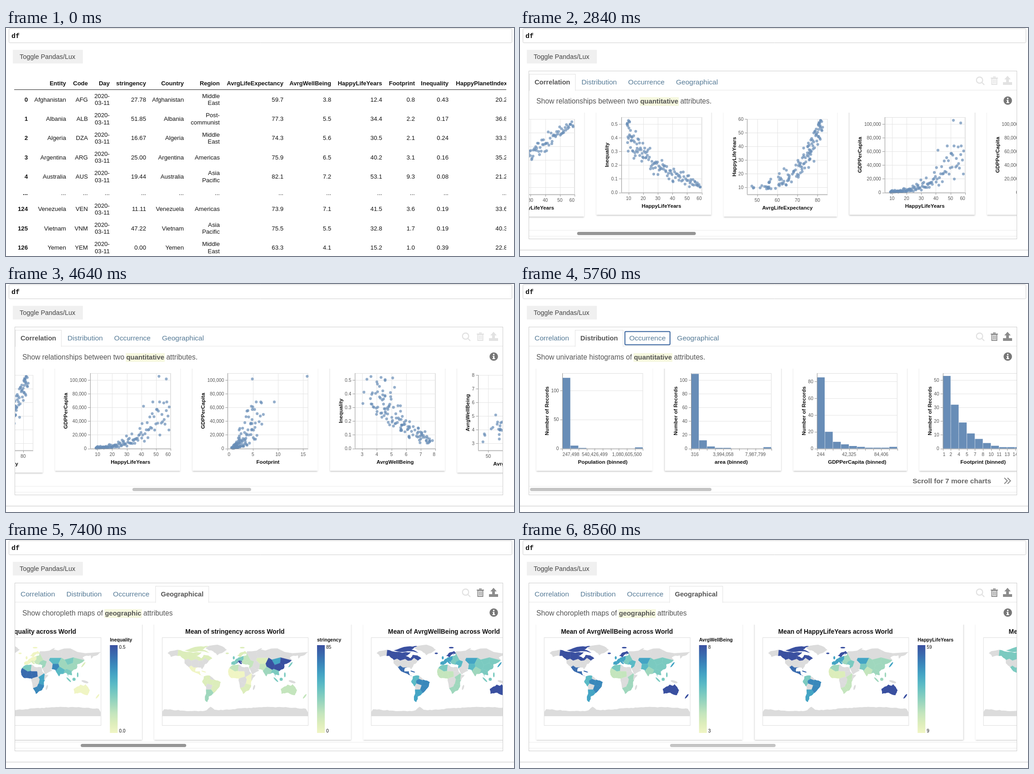
Write an HTML page with a canvas that moves like this. It is 1117 px wide and 501 px high and loops after 8.6 s.

```html
<!DOCTYPE html>
<html lang="en">
<head>
<meta charset="utf-8">
<title>Data frame widget</title>
<style>
html, body { margin: 0; width: 1117px; height: 501px; overflow: hidden; background: #fff; }
canvas { display: block; width: 1117px; height: 501px; }
</style>
</head>
<body>
<canvas id="stage"></canvas>
<script>
const W = 1117, H = 501, LOOP = 8600, STEP = 40;
const canvas = document.getElementById('stage'), c = canvas.getContext('2d');
const dpr = window.devicePixelRatio || 1;
canvas.width = W * dpr;
canvas.height = H * dpr;

const SANS = '"Liberation Sans", Arial, sans-serif';
const BLUE = '#688db7';

// ---------- drawing helpers ----------
function widthOf(s, size, bold) {
  c.font = `${bold ? 'bold ' : ''}${size}px ${SANS}`;
  return c.measureText(s).width;
}

function text(s, x, y, size = 13.2, { bold, align = 'left', color = '#111' } = {}) {
  const w = widthOf(s, size, bold);
  c.textAlign = align;
  c.textBaseline = 'alphabetic';
  c.fillStyle = color;
  c.fillText(s, x, y + size * 0.35);
  return w;
}

function rect(x, y, w, h, fill) { c.fillStyle = fill; c.fillRect(x, y, w, h); }
const hline = (x1, x2, y, color) => rect(x1, Math.round(y), x2 - x1, 1, color);
const vline = (x, y1, y2, color) => rect(Math.round(x), y1, 1, y2 - y1, color);

function frame(x, y, w, h, color, width = 1) {
  c.strokeStyle = color;
  c.lineWidth = width;
  c.strokeRect(x + width / 2, y + width / 2, w - width, h - width);
}

function upright(s, x, y) {
  c.save();
  c.translate(x, y);
  c.rotate(-Math.PI / 2);
  text(s, 0, 0, 11.6, { bold: true, align: 'center' });
  c.restore();
}

function clipTo(x, y, w, h, draw) {
  c.save();
  c.beginPath();
  c.rect(x, y, w, h);
  c.clip();
  draw();
  c.restore();
}

let seed = 7;
const rnd = () => (seed = (seed * 16807) % 2147483647) / 2147483647;
const noise = () => rnd() + rnd() + rnd() - 1.5;

// ---------- table ----------
const COLS = [
  ['', 48], ['Entity', 132], ['Code', 180], ['Day', 228], ['stringency', 308], ['Country', 391],
  ['Region', 470], ['AvrgLifeExpectancy', 610], ['AvrgWellBeing', 715], ['HappyLifeYears', 827],
  ['Footprint', 899], ['Inequality', 973], ['HappyPlanetIndex', 1102]];
const ROWS = [
  '0|Afghanistan|AFG|27.78|Middle/East|59.7|3.8|12.4|0.8|0.43|20.2',
  '1|Albania|ALB|51.85|Post-/communist|77.3|5.5|34.4|2.2|0.17|36.8',
  '2|Algeria|DZA|16.67|Middle/East|74.3|5.6|30.5|2.1|0.24|33.3',
  '3|Argentina|ARG|25.00|Americas|75.9|6.5|40.2|3.1|0.16|35.2',
  '4|Australia|AUS|19.44|Asia/Pacific|82.1|7.2|53.1|9.3|0.08|21.2',
  '...|...|...|...|...|...|...|...|...|...|...',
  '124|Venezuela|VEN|11.11|Americas|73.9|7.1|41.5|3.6|0.19|33.6',
  '125|Vietnam|VNM|47.22|Asia/Pacific|75.5|5.5|32.8|1.7|0.19|40.3',
  '126|Yemen|YEM|0.00|Middle/East|63.3|4.1|15.2|1.0|0.39|22.8'];

function drawTable() {
  clipTo(0, 90, 1100, 411, () => {
    COLS.forEach(([name, x]) => text(name, x, 121, 13, { bold: true, align: 'right' }));
    hline(18, 1100, 135, '#222');
    let top = 136;
    ROWS.forEach(row => {
      const cells = row.split('|'), gap = cells[0] === '...', height = gap ? 29 : 42.3;
      cells.splice(3, 0, gap ? '...' : '2020-/03-11');
      cells.splice(5, 0, cells[1]);
      cells.forEach((cell, i) => {
        const lines = cell.split('/');
        lines.forEach((s, k) => text(s, COLS[i][1], top + height / 2 + (k - (lines.length - 1) / 2) * 15.4,
          13.2, { bold: !i, align: 'right' }));
      });
      top += height;
    });
  });
}

// ---------- data: one correlated sample feeds every scatter plot ----------
const people = Array.from({ length: 125 }, (_, i) => {
  const h = 9 + 50.5 * Math.pow((i + rnd()) / 125, 1.45);
  const g = Math.min(68000, (600 + Math.pow(h / 60, 2.8) * 60000) * Math.exp(noise() * 0.8));
  return {
    H: h,
    L: Math.min(83.7, 84.5 - 46 * Math.exp(-h / 22) + noise() * 9 * (1 - h / 70)),
    Q: Math.max(0.04, 0.62 * Math.exp(-h / 26) + noise() * 0.12 * (1 - h / 80)),
    W: Math.min(7.8, 3.25 + 0.0745 * h + noise() * 1.15 * (1 - h / 75)),
    G: g,
    F: Math.min(9.4, (0.7 + Math.sqrt(g / 1000) * 0.62) * Math.exp(noise() * 0.5)),
  };
});
people.push({ H: 52, L: 82, Q: 0.07, W: 7, G: 105447, F: 15.8 }, { H: 57, L: 81, Q: 0.07, W: 7.6, G: 101600, F: 4.9 });

const AXES = { // name, low, high, tick step
  L: ['AvrgLifeExpectancy', 45, 85, 10], W: ['AvrgWellBeing', 2.5, 8, 1],
  H: ['HappyLifeYears', 5, 60, 10], Q: ['Inequality', 0, 0.55, 0.1],
  F: ['Footprint', 0, 16, 5], G: ['GDPPerCapita', 0, 110000, 20000] };
const PW = 177, PH = 165.5, LABEL = 10.2;

function ticks([, lo, hi, step]) {
  const out = [];
  for (let i = Math.ceil(lo / step); i * step <= hi + 1e-9; i++) out.push(i * step);
  return out;
}
const label = (v, step) => step < 1 ? v.toFixed(1) : Math.round(v).toLocaleString('en-US');

function card(x, w, bottom) {
  c.save();
  c.shadowColor = 'rgba(0,0,0,.25)';
  c.shadowBlur = 3 * dpr;
  c.shadowOffsetY = dpr;
  rect(x, 170, w, bottom - 170, '#fff');
  c.restore();
}

function tickLabel(s, x, y, x0, x1) {
  const align = x < x0 + 2 ? 'left' : x > x1 - 2 ? 'right' : 'center';
  text(s, x, y, LABEL, { align, color: '#555' });
}

// A framed plot whose left margin follows its widest y label.
function plot(title, xTitle, labels, top, paint) {
  const wide = Math.max(...labels.map(s => widthOf(s, LABEL))), left = wide + 40.5, w = left + PW + 21;
  return { w, draw(x) {
    const px = x + left, base = top + PH;
    card(x, w, base + 49);
    frame(px, top, PW, PH, '#ddd');
    paint(px, base);
    hline(px, px + PW, base, '#999');
    vline(px, top, base, '#999');
    upright(title, px - wide - 17.5, top + PH / 2);
    text(xTitle, px + PW / 2, base + 29, 11.6, { bold: true, align: 'center' });
  } };
}

const yLabels = axis => ticks(axis).map(v => label(v, axis[3]));

function yTicks(axis, px, base) {
  const [, lo, hi, step] = axis, pos = v => base - PH * (v - lo) / (hi - lo);
  ticks(axis).forEach(v => {
    hline(px, px + PW, pos(v), '#e4e4e4');
    hline(px - 5, px, pos(v), '#999');
    text(label(v, step), px - 8, pos(v), LABEL, { align: 'right', color: '#555' });
  });
  return pos;
}

function scatter(xk, yk) {
  const ax = AXES[xk], ay = AXES[yk], top = yk === 'H' || yk === 'W' ? 200 : 196;
  return plot(ay[0], ax[0], yLabels(ay), top, (px, base) => {
    const posX = v => px + PW * (v - ax[1]) / (ax[2] - ax[1]);
    ticks(ax).forEach(v => {
      vline(posX(v), top, base, '#e4e4e4');
      vline(posX(v), base, base + 5, '#999');
      tickLabel(label(v, ax[3]), posX(v), base + 12.5, px, px + PW);
    });
    const posY = yTicks(ay, px, base);
    c.globalAlpha = 0.7;
    c.fillStyle = BLUE;
    people.forEach(p => {
      c.beginPath();
      c.arc(posX(p[xk]), posY(p[yk]), 3.1, 0, 7);
      c.fill();
    });
    c.globalAlpha = 1;
  });
}

// count gives the height of each bin; tail is added to the last one
function histogram(name, max, step, count, tail, labels, every) {
  const axis = ['', 0, max, step], slot = PW / 10;
  return plot('Number of Records', name + ' (binned)', yLabels(axis), 196, (px, base) => {
    const posY = yTicks(axis, px, base);
    for (let i = 0; i <= 10; i++) {
      const n = i < 10 ? Math.round(count(i)) + (i === 9 ? tail : 0) : 0;
      if (n) rect(px + i * slot, posY(n), slot - 0.6, base - posY(n), BLUE);
      vline(px + i * slot, base, base + 5, '#999');
    }
    labels.forEach((s, i) => tickLabel(s, px + i * every * slot, base + 12.5, px, px + PW));
  });
}

function barList(name, names, share) {
  const row = PH / names.length;
  return plot(name, 'Number of Records', names, 196, (px, base) => names.forEach((s, i) => {
    const y = 196 + i * row;
    rect(px, y + 1, PW * share(i), row - 2, BLUE);
    text(s, px - 8, y + row / 2, LABEL, { align: 'right', color: '#555' });
  }));
}

// ---------- world map ----------
const SCALE = 321 / 360, mapX = lon => 160.5 + lon * SCALE, mapY = lat => 307 - lat * SCALE;
const lands = []; // { coast, cells: [key, path] }

function toPath(points) {
  const path = new Path2D();
  points.forEach(([lon, lat]) => path.lineTo(mapX(lon), mapY(lat)));
  path.closePath();
  return path;
}

// breaks each edge in two with a small sideways step
const roughen = pts => pts.flatMap((p, i) => {
  const q = pts[(i + 1) % pts.length], k = (rnd() - 0.5) * 0.24, dx = q[0] - p[0], dy = q[1] - p[1];
  return [p, [(p[0] + q[0]) / 2 - dy * k, (p[1] + q[1]) / 2 + dx * k]];
});

// part of the plane nearer to one seed than to any other
function cell(s, seeds) {
  let poly = [[-200, -100], [200, -100], [200, 100], [-200, 100]];
  seeds.filter(o => o !== s).forEach(o => {
    const side = p => (p[0] - (s.x + o.x) / 2) * (o.x - s.x) + (p[1] - (s.y + o.y) / 2) * (o.y - s.y);
    poly = poly.flatMap((p, i) => {
      const q = poly[(i + 1) % poly.length], a = side(p), b = side(q), k = a / (a - b);
      const cut = a * b < 0 ? [[p[0] + (q[0] - p[0]) * k, p[1] + (q[1] - p[1]) * k]] : [];
      return a <= 0 ? [p, ...cut] : cut;
    });
  });
  return toPath(poly);
}

// outline: "lon,lat" points; places: "key,lon,lat" seeds of the countries inside
function land(outline, places) {
  const pts = outline.split(' ').map(s => s.split(',').map(Number));
  const seeds = places.split(' ').map(s => s.split(',')).map(([key, x, y]) => ({ key, x: +x, y: +y }));
  lands.push({ coast: toPath(roughen(roughen(pts))), cells: seeds.map(s => [s.key, cell(s, seeds)]) });
}

function island(key, lon, lat, rx, ry, tilt = 0) {
  const coast = new Path2D();
  coast.ellipse(mapX(lon), mapY(lat), rx * SCALE, ry * SCALE, -tilt, 0, 7);
  lands.push({ coast, cells: [[key, coast]] });
}

const ice = Array.from({ length: 73 }, (_, i) => {
  const lon = i * 5 - 180, bay = i % 72 ? 0 : -8;
  return [lon, -72 + 5 * Math.cos((lon - 90) * Math.PI / 180) + 9 * Math.exp(-(((lon + 60) / 8) ** 2)) + bay + noise()];
});
const icePath = toPath([[-180, -90], ...ice, [180, -90]]);
lands.push({ coast: icePath, cells: [['', icePath]] });

// North and Central America, arctic islands, Greenland
land('-166,66 -156,71 -128,70 -95,68 -82,68 -94,59 -82,53 -77,61 -66,60 -56,52 -66,44 -75,37 -81,25 -84,30 -97,28 -97,20 -87,21 -84,11 -78,8 -94,16 -106,21 -114,31 -124,40 -124,49 -135,59 -158,56',
  ',-156,63 ca,-126,60 ca,-105,60 ca,-85,58 ca,-62,54 ,-118,38 ,-98,38 ,-82,36 ,-70,42 mx,-108,24 mx,-97,22 mx,-86,14');
land('-124,72 -90,82 -65,83 -80,74 -63,66 -90,70', 'ca,0,0');
land('-73,78 -33,83 -20,74 -44,60 -54,70', ',0,0');
// South America
land('-77,8 -62,10 -50,0 -35,-6 -40,-20 -54,-34 -65,-42 -68,-55 -74,-50 -71,-18 -81,-5',
  'an,-74,3 an,-66,7 an,-76,-9 ,-56,6 ,-64,-17 br,-60,-5 br,-48,-8 br,-50,-22 ar,-64,-32 ar,-69,-45');
// Africa
land('-17,21 -6,36 10,37 20,31 33,31 43,12 51,12 40,-5 40,-15 33,-27 20,-35 12,-18 9,3 -8,4 -16,12',
  'na,0,29 ,17,27 ,29,25 ,30,15 wa,-8,16 wa,3,12 wa,17,14 ,22,-2 ea,36,6 ea,35,-5 ,46,5 ,17,-12 za,22,-25 za,31,-18');
// Eurasia and Scandinavia
land('-9,37 -9,43 -1,46 9,55 28,60 30,70 75,72 105,77 180,68 162,58 156,52 155,60 135,54 140,48 127,39 122,38 121,28 108,20 109,11 100,13 103,2 94,17 80,14 77,8 68,24 56,26 59,22 44,13 35,29 36,36 27,37 23,38 13,45 18,40 15,38 8,44 -1,37',
  'we,-4,40 we,4,48 we,14,51 it,12,42 ee,23,43 ee,29,51 tr,35,39 ,42,58 ,67,60 ,100,58 ,125,60 ,160,62 kz,67,47 mn,103,46 cn,87,37 cn,108,32 cn,121,44 in,78,22 pk,67,31 ,53,33 ,46,23 se,101,14');
land('5,59 12,66 25,71 30,66 22,60 24,66 17,60 13,55', 'sc,0,0');
// Australia and islands
land('113,-23 130,-12 137,-15 142,-11 153,-26 148,-38 131,-32 115,-35', 'au,0,0');
island('sc', -19, 65, 4, 2);
island('sc', 18, 79, 6, 2);
island('we', -3, 54, 2.5, 4);
island('mx', -77, 20, 6, 1.4, -0.3);
island('', 60, 74, 8, 1.5, 0.5);
island('jp', 137, 37, 8, 2, 0.9);
island('se', 101, 0, 8, 2, -0.8);
island('se', 114, 1, 4, 4);
island('se', 123, 12, 2, 6);
island('', 141, -5, 9, 3, -0.3);
island('au', 172, -41, 7, 2, 0.9);
island('', 47, -19, 2.3, 6.5, -0.3);

const RAMP = '#f0f5c4 #dcedbb #c4e5bd #9fd7bd #7bcac0 #5abac5 #44a4c4 #3a88bb #396bae #3a50a0'.split(' ');
// shades for well-being, inequality and stringency
const PLACES = {
  ca: '901', mx: '850', an: '541', br: '741', ar: '633', we: '604', it: '619', sc: '901', ee: '422', kz: '651', mn: '446',
  cn: '439', in: '353', pk: '572', tr: '532', se: '444', jp: '614', au: '902', na: '442', wa: '280', ea: '360', za: '371' };
const MEASURES = {
  well: s => +s[0], unequal: s => +s[1], strict: s => +s[2],
  years: s => s[0] * 1.25 - 2, income: s => s[0] ** 2 / 12, use: s => (s[0] - 1) / 2 };

function choropleth(name, low, high, measure) {
  const w = 379.5 + widthOf(name, 10.5, true);
  const shade = key => key ? RAMP[Math.max(0, Math.min(9, Math.round(MEASURES[measure](PLACES[key]))))] : '#dcdcdc';
  return { w, draw(x) {
    const mx = x + 17, bar = x + 358;
    card(x, w, 439);
    text(`Mean of ${name} across World`, mx + 160.5, 201, 13.9, { bold: true, align: 'center' });
    clipTo(mx, 214, 322, 195, () => {
      c.translate(mx, 0);
      c.lineWidth = 0.5;
      lands.forEach(({ coast, cells }) => {
        c.save();
        c.clip(coast);
        cells.forEach(([key, path]) => {
          c.fillStyle = c.strokeStyle = shade(key);
          c.fill(path);
          c.stroke(path);
        });
        c.restore();
      });
    });
    frame(mx, 214, 322, 194, '#ddd');
    text(name, bar, 219, 10.5, { bold: true });
    const grad = c.createLinearGradient(0, 424, 0, 231);
    RAMP.forEach((col, i) => grad.addColorStop(i / 9, col));
    rect(bar, 231, 17, 193, grad);
    text(high, bar + 20, 235, 10.2);
    text(low, bar + 20, 419, 10.2);
  } };
}

// ---------- tabs ----------
const TABS = [
  { name: 'Correlation', more: 12, thumb: 261, ratio: 4.045,
    note: ['Show relationships between two ', 'quantitative', ' attributes.'],
    cards: ['LQ', 'HW', 'HQ', 'LH', 'HG', 'FG', 'WQ', 'LW'].map(([x, y]) => scatter(x, y)) },
  { name: 'Distribution', more: 7, thumb: 399, ratio: 2.7,
    note: ['Show univariate histograms of ', 'quantitative', ' attributes.'],
    cards: [
      histogram('Population', 130, 50, i => 122 * (i + 1) ** -4.6, 2, ['247,498', '540,426,499', '1,080,605,500'], 4),
      histogram('area', 110, 20, i => 109 * (i + 1) ** -3.2, 2, ['316', '3,994,058', '7,987,799'], 4),
      histogram('GDPPerCapita', 90, 20, i => 85 * (i + 1) ** -2.1, 1, ['244', '42,325', '84,406'], 4),
      histogram('Footprint', 55, 10, i => 53 * 0.6 ** i, 0, ['1', '2', '4', '5', '7', '8', '10', '11', '13', '14'], 1)] },
  { name: 'Occurrence', more: 2, thumb: 640, ratio: 1.7,
    note: ['Show frequency of occurrence for ', 'categorical', ' attributes.'],
    cards: [
      barList('Region', ['Sub Saharan', 'Post-communist', 'Americas', 'Europe', 'Asia Pacific', 'Middle East'], i => 1 - i * 0.11),
      ...['Country', 'Entity', 'Code'].map(name => barList(name,
        ROWS.slice(0, 5).map(r => r.split('|')[name === 'Code' ? 2 : 1]), () => 1))] },
  { name: 'Geographical', more: 8, thumb: 232, ratio: 4.525,
    note: ['Show choropleth maps of ', 'geographic', ' attributes'],
    cards: [
      choropleth('GDPPerCapita', '244', '105,447', 'income'), choropleth('Inequality', '0.0', '0.5', 'unequal'),
      choropleth('stringency', '0', '85', 'strict'), choropleth('AvrgWellBeing', '3', '8', 'well'),
      choropleth('HappyLifeYears', '9', '59', 'years'), choropleth('Footprint', '1', '16', 'use')] },
];

// ---------- icons ----------
function icons(dark) {
  const light = '#e2e2e2', tone = dark ? '#8c8c8c' : light;
  c.lineWidth = 2.4;
  c.strokeStyle = light;
  c.beginPath();
  c.arc(1010.5, 114.5, 6.8, 0, 7);
  c.moveTo(1015.5, 119.5);
  c.lineTo(1021, 125);
  c.stroke();
  // bin
  rect(1035, 109, 16, 2, tone);
  rect(1040, 106.5, 6, 2, tone);
  c.strokeStyle = tone;
  c.lineWidth = 2;
  c.strokeRect(1037.5, 111, 11, 13);
  for (let i = 0; i < 3; i++) rect(1040 + i * 2.5, 113, 1.3, 9, tone);
  // upload
  rect(1062, 119, 20, 6, tone);
  rect(1069, 112, 6, 8, tone);
  c.beginPath();
  c.moveTo(1072, 105);
  c.lineTo(1079, 113);
  c.lineTo(1065, 113);
  c.fill();
  // info
  c.fillStyle = '#777';
  c.beginPath();
  c.arc(1072.5, 159.5, 9.3, 0, 7);
  c.fill();
  rect(1071, 153.5, 3, 3, '#fff');
  rect(1070, 158, 4, 2, '#fff');
  rect(1071, 158, 3, 6, '#fff');
  rect(1069.5, 163, 6, 2, '#fff');
}

function chevrons() {
  c.strokeStyle = '#888';
  c.lineWidth = 2;
  c.beginPath();
  [1065, 1072].forEach(x => {
    c.moveTo(x, 426);
    c.lineTo(x + 6.5, 432.5);
    c.lineTo(x, 439);
  });
  c.stroke();
}

function tabBar(active, ring) {
  hline(20, 1092, 136, '#e6e6e6');
  let x = 32;
  TABS.forEach(({ name }, i) => {
    const bold = i === active, size = bold ? 14.7 : 15.5, w = widthOf(name, size, bold);
    if (bold) {
      frame(x - 12, 101, w + 24, 37, '#e0e0e0');
      rect(x - 11, 136, w + 22, 3, '#fff');
    }
    text(name, x, 119, size, { bold, color: bold ? '#555' : '#557a96' });
    if (i === ring) {
      c.strokeStyle = '#35619c';
      c.lineWidth = 2;
      c.beginPath();
      c.roundRect(x - 9.5, 104.5, w + 19, 29, 2);
      c.stroke();
    }
    x += w + 25;
  });
}

function drawWidget(tabNo, ring, thumb, dragging) {
  const tab = TABS[tabNo];
  frame(19, 94, 1074, 370, '#ccc');
  tabBar(tabNo, ring);
  icons(tabNo > 0);

  let x = 36;
  tab.note.forEach((s, i) => {
    const bold = i === 1, size = bold ? 14.9 : 15.7;
    if (bold) rect(x - 1, 152, widthOf(s, size, bold) + 2, 19, '#f6f8df');
    x += text(s, x, 161, size, { bold, color: '#555' });
  });

  clipTo(20, 186, 1072, 259, () => {
    let left = 36 - thumb * tab.ratio;
    tab.cards.forEach(k => {
      if (left < 1095 && left + k.w > 15) k.draw(left);
      left += k.w + 27;
    });
  });
  if (!thumb) {
    text(`Scroll for ${tab.more} more charts`, 1036, 433, 15.4, { bold: true, align: 'right', color: '#666' });
    chevrons();
  }
  hline(20, 1092, 444, '#ececec');
  hline(20, 1092, 457, '#ececec');
  c.fillStyle = dragging ? '#969696' : '#c4c4c4';
  c.beginPath();
  c.roundRect(22 + thumb, 448, tab.thumb, 7, 3.5);
  c.fill();
  rect(0, 487, W, 2, '#e0e0e0');
}

// ---------- timeline ----------
const within = (t, a, b) => t >= a && t < b;
const travel = (t, start, speed, max) => Math.min(max, Math.max(0, (t - start) * speed));

function draw(t) {
  c.setTransform(dpr, 0, 0, dpr, 0, 0);
  rect(0, 0, W, H, '#fff');
  c.strokeStyle = '#cfcfcf';
  c.lineWidth = 1;
  c.beginPath();
  c.roundRect(6.5, 1.5, 1106, 31, 2);
  c.stroke();
  c.font = 'bold 15px "Liberation Mono", monospace';
  c.fillStyle = '#111';
  c.textAlign = 'left';
  c.fillText('df', 12, 22);

  rect(15, 48, 154, 30, '#f0f0f0');
  if (within(t, 200, 1880)) frame(14, 47, 156, 32, '#9fc0d8');
  text('Toggle Pandas/Lux', 30, 63, 14.4, { color: '#444' });

  if (t < 640) drawTable();
  else if (t >= 1200) {
    const tab = t < 4840 ? 0 : t < 5840 ? 1 : t < 6320 ? 2 : 3;
    const ring = within(t, 4760, 4840) ? 1 : within(t, 5720, 5840) ? 2 : within(t, 6240, 6320) ? 3 : -1;
    const thumb = tab === 0 ? travel(t, 2160, 0.1523, 256) : tab === 3 ? travel(t, 6534, 0.1643, 308) : 0;
    drawWidget(tab, ring, thumb, within(t, 2120, 3880) || within(t, 6520, 8440));
  }
}

function tick() {
  draw(Math.floor(performance.now() % LOOP / STEP) * STEP);
  requestAnimationFrame(tick);
}
tick();
</script>
</body>
</html>
```
